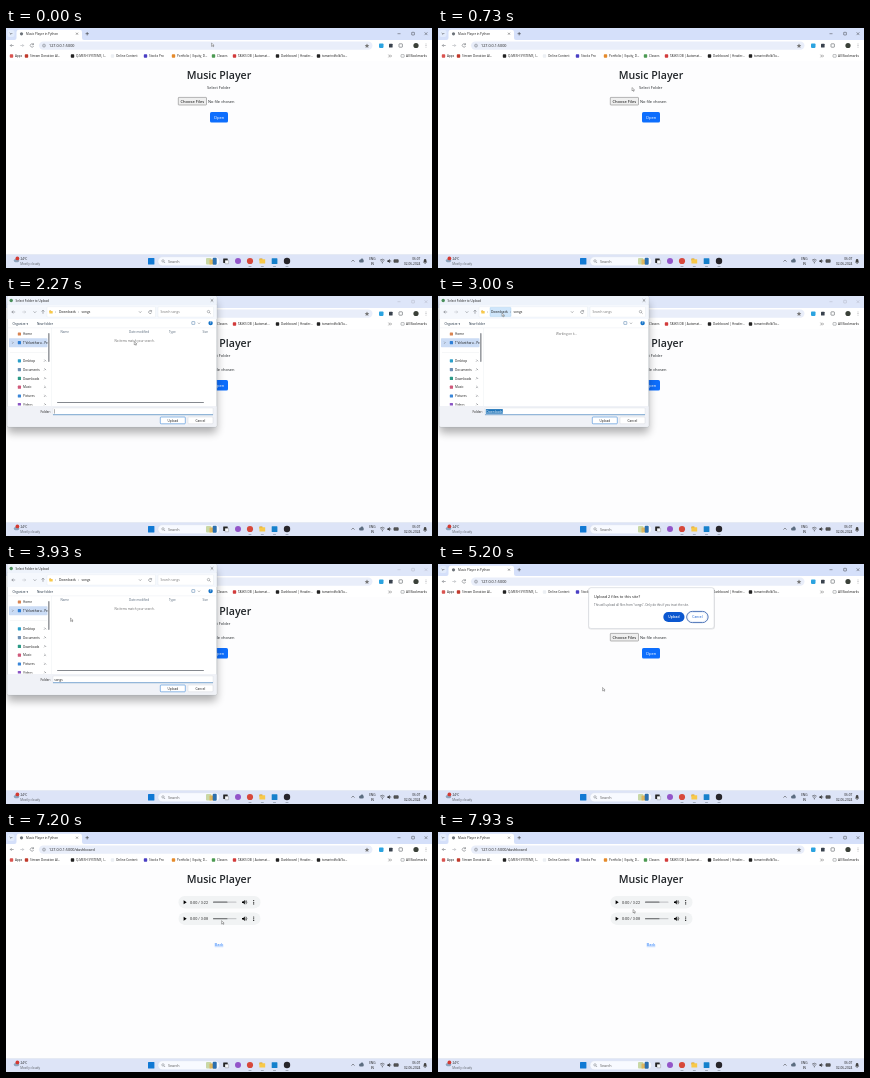
An HTML page for the animation above (8 s loop, 426 px wide and 240 px high).

```html
<!DOCTYPE html>
<html lang="en">
<head>
<meta charset="utf-8">
<title>Music Player</title>
<style>
html, body { margin: 0; width: 100%; height: 100%; overflow: hidden; background: #fff; }
svg { display: block; width: 100vw; height: 100vh; }
text { font-family: 'Open Sans', 'Noto Sans', sans-serif; white-space: pre; }
</style>
</head>
<body>
<svg id="stage" viewBox="0 0 426 240" preserveAspectRatio="none"></svg>
<script>
const LOOP = 8000;
const INK = '#1a1a1a', GREY = '#5a5e64', BLUE = '#0d6efd';

const rect = (x, y, w, h, fill, rx = 0, extra = '') =>
  `<rect x="${x}" y="${y}" width="${w}" height="${h}" rx="${rx}" fill="${fill}" ${extra}/>`;
const dot = (x, y, r, fill, extra = '') =>
  `<circle cx="${x}" cy="${y}" r="${r}" fill="${fill}" ${extra}/>`;
const line = (d, color = GREY, w = 0.5) =>
  `<path d="${d}" fill="none" stroke="${color}" stroke-width="${w}"/>`;
const shape = (d, fill) => `<path d="${d}" fill="${fill}"/>`;
const text = (x, y, s, size = 3.1, fill = INK, extra = '') =>
  `<text x="${x}" y="${y}" font-size="${size}" fill="${fill}" ${extra}>${s}</text>`;
const mid = (x, y, s, size, fill, extra = '') =>
  text(x, y, s, size, fill, 'text-anchor="middle" ' + extra);
const group = (id, body) => `<g id="${id}">${body}</g>`;
const stroke = (color, w = 0.4) => `stroke="${color}" stroke-width="${w}"`;
const cross = (x, y, r = 1.4) =>
  line(`M${x - r} ${y - r}l${2 * r} ${2 * r}m0 ${-2 * r}l${-2 * r} ${2 * r}`, INK, 0.4);
const arrow = (x, y, dir, color = GREY) =>
  line(`M${x - 1.7 * dir} ${y}h${3.4 * dir}m${-1.4 * dir} -1.4l${1.4 * dir} 1.4l${-1.4 * dir} 1.4`, color);
const lens = (x, y) =>
  dot(x, y, 1.2, 'none', stroke(GREY)) + line(`M${x + 0.9} ${y + 0.9}l1.2 1.2`);
const folder = (x, y, s = 1) =>
  rect(x - 1.7 * s, y - 1.5 * s, 1.8 * s, 1.2 * s, '#d99a1c', 0.3) +
  rect(x - 1.7 * s, y - 1 * s, 3.4 * s, 2.5 * s, '#f8c94a', 0.3);

function browser() {
  const marks = [
    [9, 'Apps', '#d9534f'], [24, 'Stream Donation Al...', '#c0392b'],
    [70, 'Q-MESH SYSTEMS, I...', '#222'], [110, 'Online Content', '#eceff3'],
    [143, 'Stocks Pro', '#4a3fc4'], [171, 'Portfolio | Equity, D...', '#e58a2b'],
    [211, 'Classes', '#4c9a52'], [232, 'TASKS DB | Automat...', '#d23b3b'],
    [275, 'Dashboard | Header...', '#222'], [316, 'tamarindfolk/Su...', '#222']
  ];
  return rect(0, 0, 426, 240, '#fdfdfe') +
    rect(0, 0, 426, 12, '#d5e0fa') +
    rect(1.5, 2, 7, 7, '#e3ecfc', 2) + line('M3.7 5l1.3 1.3l1.3 -1.3', INK) +
    shape('M8.5 12Q10.5 12 10.5 10V4Q10.5 1.7 13 1.7H73.5Q76 1.7 76 4V10Q76 12 78 12Z', '#fff') +
    dot(15.5, 5.8, 1.6, '#6b7178') +
    text(20, 7, 'Music Player in Python', 3.05) + cross(71, 5.7, 1) +
    line('M79.5 5.7h3.4m-1.7 -1.7v3.4', INK) +
    line('M391.5 5.7h3', INK, 0.4) + rect(405.7, 4.3, 2.7, 2.7, 'none', 0.3, stroke(INK)) + cross(420, 5.7) +
    rect(0, 0, 426, 12, '#e3e9fa', 0, 'id="inactive" opacity=".7"') +
    rect(0, 12, 426, 21, '#fff') +
    arrow(6, 17.5, -1) + arrow(16, 17.5, 1, '#a0a4aa') +
    line('M27.4 16.5a1.7 1.7 0 1 0 .2 1.5m-.1 -2.8v1.5h-1.5') +
    rect(33, 13.4, 333.5, 8.4, '#e9eefa', 4.2) +
    dot(38, 17.6, 1.5, 'none', stroke(GREY)) + line('M38 17.2v1.3m0 -2v.3') +
    `<text id="url" x="43" y="19" font-size="3.75" fill="${INK}"></text>` +
    shape('M361 15.5l.7 1.5l1.6 .2l-1.2 1.1l.3 1.6l-1.4 -.8l-1.4 .8l.3 -1.6l-1.2 -1.1l1.6 -.2z', '#777') +
    rect(373, 15.4, 4.5, 4.5, '#2ba3e0', 0.8) + rect(383, 15.7, 3.6, 3.8, '#39424e', 0.6) +
    rect(393, 15.8, 3.4, 3.4, 'none', 0.5, stroke(GREY, 0.6)) +
    dot(410, 17.5, 2.6, '#3a4038') +
    [15.9, 17.5, 19.1].map(y => dot(420, y, 0.4, GREY)).join('') +
    marks.map(([x, s, c]) => rect(x - 5.2, 26.3, 3.4, 3.4, c, 0.7) + text(x, 29.2, s, 3.05)).join('') +
    line('M382.5 26.7l1.2 1.3l-1.2 1.3m1.8 -2.6l1.2 1.3l-1.2 1.3', INK, 0.4) +
    rect(395, 26.6, 3.2, 2.6, 'none', 0.4, stroke(GREY)) +
    text(400, 29.2, 'All Bookmarks', 3.15);
}

function page() {
  return mid(213, 51.2, 'Music Player', 10.6, '#212529', 'font-weight="600"') +
    group('form',
      mid(212.7, 60.8, 'Select Folder', 3.9, '#212529') +
      rect(172.3, 69.4, 28.2, 7.6, '#efefef', 0.6, stroke('#6f6f6f', 0.5)) +
      mid(186.4, 74.7, 'Choose Files', 4.1, '#000') +
      '<text id="picked" x="202" y="74.7" font-size="4" fill="#212529"></text>' +
      rect(204, 84, 18, 10.5, BLUE, 1.6) + mid(213, 90.8, 'Open', 4.2, '#fff')) +
    group('songs', player(64, '3:22') + player(80.5, '3:08') +
      mid(213, 114, 'Back', 4.1, BLUE) + line('M208.7 114.7h8.6', BLUE, 0.25));
}

function player(y, length) {
  const c = y + 6.2;
  return rect(172.5, y, 82, 12.4, '#f1f3f4', 6.2) +
    shape(`M177.6 ${c - 2}v4l3.1 -2z`, '#000') +
    text(184, c + 1.4, '0:00 / ' + length, 3.8, '#333', `style="font-family:Roboto,sans-serif"`) +
    rect(207, c - 0.6, 23.5, 1.2, '#c6c8ca', 0.6) + rect(207, c - 0.6, 14.5, 1.2, '#7a7c7e', 0.6) +
    shape(`M236 ${c - 0.8}h1.2l1.6 -1.5v4.6l-1.6 -1.5h-1.2z`, '#000') +
    line(`M239.4 ${c - 1}q1 1 0 2m.5 -3.1q2 2.1 0 4.2`, '#000', 0.5) +
    [-1.7, 0, 1.7].map(d => dot(247.7, c + d, 0.55, '#000')).join('');
}

function dialog() {
  const places = [
    ['Home', 38, '#d98452'], ['T Velantharu - Pe', 46.7, '#2f7fd6'], ['Desktop', 64.8, '#2b9fc9'],
    ['Documents', 73.6, '#6d8fb3'], ['Downloads', 82.4, '#2c9a86'], ['Music', 91.2, '#d0587a'],
    ['Pictures', 100, '#3a86d8'], ['Videos', 108.6, '#8a55c4']
  ];
  const side = places.map(([s, y, c], i) =>
    rect(11.8, y - 1.6, 3.2, 3.2, c, 0.6) + text(17, y + 1.1, s, 3.15) +
    (i > 1 ? line(`M38 ${y + 0.9}l1 -1m-.6 -1.1l1.7 1.7`, GREY, 0.5) : '')).join('');
  const columns = [[54.5, 'Name'], [123, 'Date modified'], [163, 'Type'], [196.5, 'Size']];
  return '<filter id="blur" x="-20%" y="-20%" width="140%" height="140%"><feGaussianBlur stdDeviation="4.5"/></filter>' +
    rect(1.3, 6, 209.5, 131, '#000', 3, 'opacity=".3" filter="url(#blur)"') +
    rect(1.3, 0, 209.5, 131, '#fff', 1.6, stroke('#9aa2ad', 0.4)) +
    rect(1.5, 0, 209.1, 9, '#eef3fb', 1) + dot(5.2, 4.5, 1.7, '#4a8f5a') +
    text(9.5, 5.7, 'Select Folder to Upload', 3.1) + cross(206, 4.4, 1.3) +
    rect(1.5, 9, 209.1, 14, '#f5f8fd') +
    arrow(7.5, 16, -1) + arrow(18, 16, 1, '#b0b4ba') + line('M27.6 15.4l1.3 1.3l1.3 -1.3') +
    line('M37 17.8v-3.6m-1.4 1.4l1.4 -1.4l1.4 1.4') +
    rect(41, 10.7, 108.5, 10.4, '#fff', 0.8, stroke('#dde2ea', 0.3)) + folder(45, 16) +
    rect(52, 11.4, 21, 9, '#cfe6fb', 0.6, `id="crumb" ${stroke('#8abdea', 0.3)}`) +
    text(49, 17, '›', 3.3, GREY) + text(53, 17.1, 'Downloads', 3.25) +
    text(72, 17.1, '›', 3.3, GREY) + text(75.5, 17.1, 'songs', 3.25) +
    line('M133 15.4l1.2 1.2l1.2 -1.2') + line('M145.4 15.2a1.5 1.5 0 1 0 .2 1.3m0 -2.4v1.2h-1.3') +
    rect(152, 10.7, 55.5, 10.4, '#fff', 0.8, stroke('#dde2ea', 0.3)) +
    text(154.5, 17.1, 'Search songs', 3.15, '#777') + lens(202.5, 15.6) +
    text(6.5, 28.5, 'Organize ▾', 3.15, '#234') + text(31, 28.5, 'New folder', 3.15, '#234') +
    rect(185.8, 25.6, 3, 2.8, 'none', 0.3, stroke('#4a7aa8', 0.5)) + line('M192 26.7l1 1l1 -1') +
    dot(204.6, 27.1, 2.2, '#1573c8') + mid(204.6, 28.2, '?', 3, '#fff', 'font-weight="700"') +
    rect(1.5, 31.8, 209.1, 0.3, '#dde2ea') +
    `<clipPath id="tree"><path d="M2 32H44V109.5H2Z"/></clipPath><g clip-path="url(#tree)">` +
    rect(3, 42.3, 38.5, 8.9, '#cbdcf5', 0.6) + line('M6.2 45.7l1 1l-1 1') + side +
    rect(4, 56, 37, 0.3, '#dfe3e8') + '</g>' +
    rect(42, 37, 1.6, 29, '#9a9da2', 0.8) + rect(45, 32, 0.3, 78, '#e2e6ec') +
    group('columns', columns.map(([x, s]) => text(x, 36.8, s, 3.05, '#56677a')).join('') +
      rect(51, 106.1, 147, 0.8, '#85898f', 0.4)) +
    '<text id="note" x="128.5" font-size="3" fill="#6a6a6a" text-anchor="middle"></text>' +
    rect(1.5, 110, 209.1, 20.5, '#f0f2f7', 1.2) +
    text(34.5, 116.7, 'Folder:', 3.15) +
    rect(47, 112, 160, 7, '#fff', 0.5, stroke('#d0d5dc', 0.3)) + rect(47, 118.5, 160, 0.6, '#2f74b8') +
    rect(47.8, 113.1, 17, 4.6, '#1f74b8', 0, 'id="sel"') +
    '<text id="name" x="48.2" y="116.6" font-size="3.15"></text>' +
    rect(48.2, 113.2, 0.3, 4.4, '#000', 0, 'id="caret"') +
    rect(154.3, 121, 25, 6.8, '#fff', 0.8, stroke('#1f74cf', 0.5)) + mid(166.8, 125.5, 'Upload', 3.2) +
    rect(182, 121, 25, 6.8, '#fff', 0.8, stroke('#c9ced6', 0.4)) + mid(194.5, 125.5, 'Cancel', 3.2);
}

function prompt() {
  return rect(150, 23.5, 127, 42, '#000', 3, 'opacity=".10"') +
    rect(150.7, 23.7, 125.3, 40.8, '#fff', 2.6, stroke('#c4cad3', 0.4)) +
    text(156, 34.2, 'Upload 2 files to this site?', 3.9, INK, 'font-weight="500"') +
    text(156, 42, 'This will upload all files from "songs". Only do this if you trust the site.', 2.95, GREY) +
    rect(225.3, 48, 21.2, 10, '#0b57d0', 5) + mid(235.9, 54.2, 'Upload', 3.3, '#fff', 'font-weight="600"') +
    rect(248.7, 47.4, 21.4, 11.2, '#fff', 5.6, stroke('#4d74b8', 1)) +
    rect(249.8, 48.5, 19.2, 9, '#fff', 4.5, stroke('#b9cdf0', 0.3)) + mid(259.4, 54.2, 'Cancel', 3.3, '#0b57d0');
}

function taskbar() {
  const right = (y, s) => text(414.3, y, s, 3.15, INK, 'text-anchor="end"');
  return rect(0, 226.6, 426, 13.4, '#dde4f7') + rect(0, 226.4, 426, 0.3, '#c8d2e2') +
    rect(7.8, 231, 5.4, 3.2, '#8ea4bd', 1.6) + dot(11.4, 230.4, 1.9, '#d33a32') +
    text(14.5, 232.3, '24°C', 3.1) + text(14.2, 236.8, 'Mostly cloudy', 3.1, GREY) +
    rect(142, 230, 6.4, 6.4, '#1179d4', 0.5) +
    rect(152, 228.8, 61.5, 9, '#f8faff', 4.5, stroke('#c8d2e2', 0.3)) + lens(157, 232.9) +
    text(162, 234.6, 'Search', 3.7, '#555') +
    rect(200, 230, 5.5, 6.6, '#c9d8a6', 1) + rect(203.5, 231.5, 4, 5.1, '#e0b65c', 0.6) + rect(206.7, 229.8, 4, 7, '#2c6fae', 1) +
    rect(217.2, 230.4, 4.5, 4.5, '#222', 0.4) + rect(219, 232.2, 3.6, 3.6, '#f5f7fb', 0.4, stroke('#555', 0.3)) +
    dot(232, 233, 3, '#9355c9') + dot(244, 233, 3.1, '#d7483b') + folder(256.3, 233, 1.7) +
    rect(265.7, 230.2, 5.7, 5.7, '#1681cc', 0.5) + dot(281, 233, 3.2, '#27252a') +
    [244, 256.3, 268.5, 281].map(x => rect(x - 1.5, 237.9, 3, 0.6, '#6a7684', 0.3)).join('') +
    line('M345.5 233.6l1.5 -1.5l1.5 1.5', INK) +
    rect(353, 231.6, 4.8, 3, '#5d6d80', 1.5) + dot(356, 231.8, 1.3, '#5d6d80') +
    mid(366.3, 232.2, 'ENG', 3.1, INK) + mid(366.3, 236.7, 'IN', 3.1, INK) +
    line('M374 232.2q2.3 -2 4.6 0m-3.7 1.2q1.4 -1.2 2.8 0', INK) + dot(376.3, 234.7, 0.5, INK) +
    shape('M381.3 232.4h1l1.4 -1.3v4l-1.4 -1.3h-1z', INK) + line('M384.4 232q1 1.1 0 2.2', INK, 0.4) +
    rect(387.8, 231.6, 4.6, 2.8, '#555', 0.5, stroke(INK, 0.3)) +
    right(232.3, '06:07') + right(236.8, '02-06-2024') +
    shape('M417 234.6q.8 -.7 .8 -2.2a1.3 1.3 0 0 1 2.6 0q0 1.5 .8 2.2z', '#444') + dot(419.1, 235.2, 0.6, '#444');
}

const stage = document.getElementById('stage');
stage.innerHTML = browser() + page() + group('dialog', dialog()) + group('prompt', prompt()) + taskbar() +
  group('cursor', `<path d="M0 0v3.4l.9 -.8l.6 1.3l.6 -.3l-.6 -1.2h1.1z" fill="#fff" ${stroke('#333', 0.35)}/>`);

const ui = {};
stage.querySelectorAll('[id]').forEach(el => ui[el.id] = el);
const show = (el, on) => el.setAttribute('display', on ? 'inline' : 'none');
const put = (el, s) => { if (el.textContent !== s) el.textContent = s; };

// time, x, y
const PATH = [
  [0, 205.5, 15], [250, 205.5, 15], [950, 190.5, 73], [1900, 190.5, 73], [2650, 64, 17],
  [3050, 64, 17], [3500, 64.5, 54], [4050, 64.5, 54], [4650, 164.5, 123.5], [5300, 164.5, 123.5],
  [5750, 237, 54], [5950, 237, 54], [6350, 218, 90], [7100, 218, 90], [7600, 195, 77.5], [LOOP, 195, 77.5]
];

function pointer(t) {
  const i = PATH.findIndex(p => p[0] > t);
  const [t0, x0, y0] = PATH[i - 1], [t1, x1, y1] = PATH[i];
  const k = (t - t0) / (t1 - t0), e = k * k * (3 - 2 * k);
  return [x0 + (x1 - x0) * e, y0 + (y1 - y0) * e];
}

function draw(t) {
  const within = (a, b) => t >= a && t < b;
  const picking = within(1150, 4800), loading = within(2800, 3550), done = t >= 7200;
  show(ui.dialog, picking);
  show(ui.inactive, picking);
  show(ui.prompt, within(4800, 5900));
  show(ui.form, !done);
  show(ui.songs, done);
  show(ui.crumb, within(2600, 3250));
  show(ui.columns, !loading);
  show(ui.sel, loading);
  show(ui.caret, t < 2800 && t % 1060 < 530);
  put(ui.url, '127.0.0.1:5000' + (done ? '/dashboard' : ''));
  put(ui.picked, t < 5900 ? 'No file chosen' : '2 files');
  put(ui.note, loading ? 'Working on it...' : 'No items match your search.');
  ui.note.setAttribute('y', loading ? 39 : 46);
  put(ui.name, t < 2800 ? '' : loading ? 'Downloads' : 'songs');
  ui.name.setAttribute('fill', loading ? '#fff' : INK);
  ui.cursor.setAttribute('transform', `translate(${pointer(t)})`);
}

const start = performance.now();
function tick() {
  draw((performance.now() - start) % LOOP);
  requestAnimationFrame(tick);
}
tick();
</script>
</body>
</html>
```
